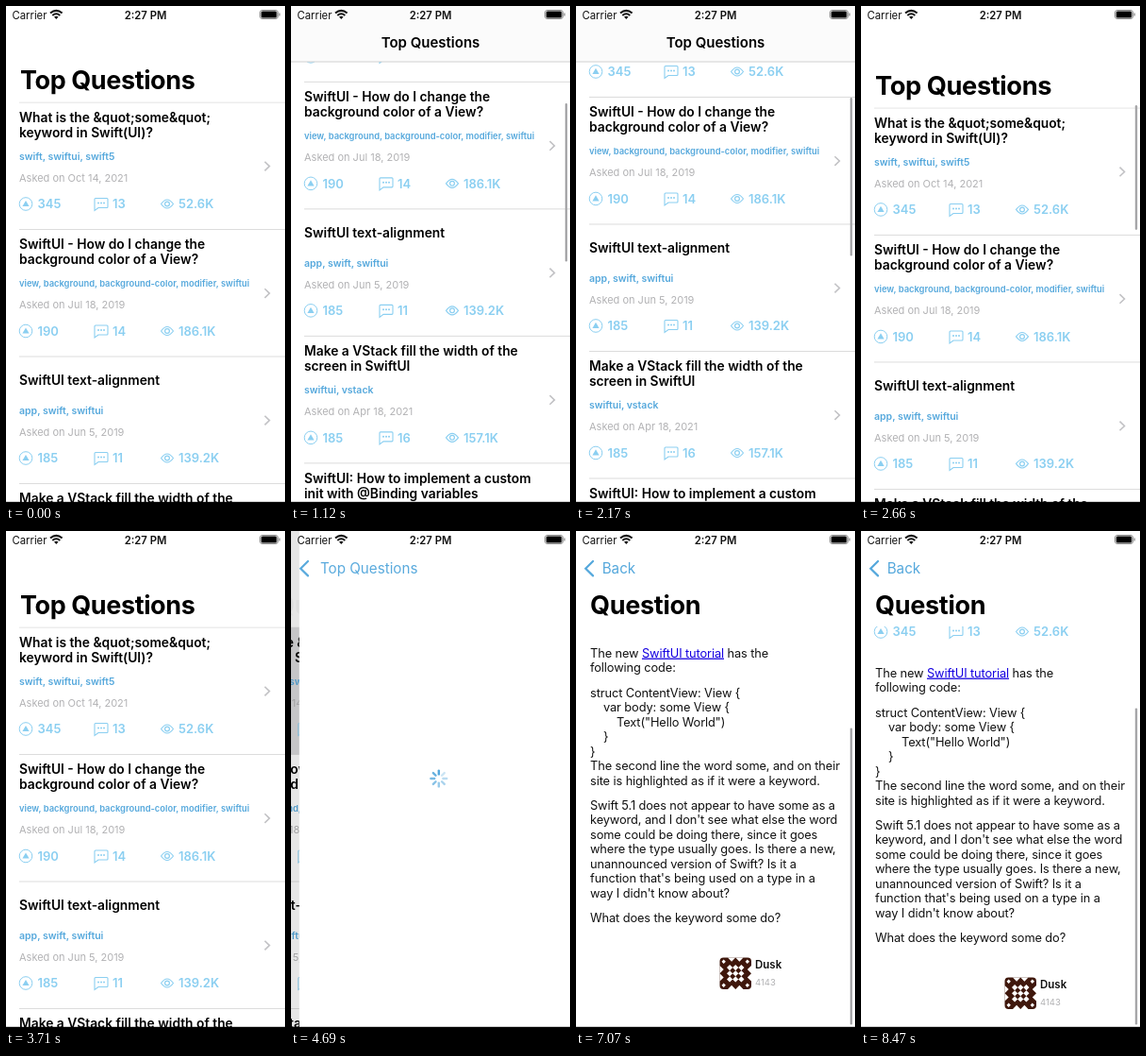
Write an HTML page that moves like this. It is 296 px wide and 526 px high and loops after 8540 ms.

```html
<!DOCTYPE html>
<html lang="en">
<head>
<meta charset="utf-8">
<title>Top Questions</title>
<style>
html, body { margin: 0; width: 100%; height: 100%; overflow: hidden; background: #fff; }
svg { display: block; }
text { font-family: Inter, Roboto, sans-serif; white-space: pre; }
</style>
</head>
<body>
<svg id="stage" width="296" height="526" viewBox="0 0 296 526"></svg>
<script>
const LOOP = 8540, BLUE = '#55a8dc', PALE = '#8bcff1', GRAY = '#b2b2b4', INK = '#111';
const $ = id => document.getElementById(id);
const esc = s => s.replace(/&/g, '&amp;');

// y is the middle of the capitals
const text = (x, y, size, weight, fill, s, spacing = 0, extra = '') =>
  `<text x="${x}" y="${y + size * .36}" font-size="${size}" font-weight="${weight}" fill="${fill}" letter-spacing="${spacing}" ${extra}>${s}</text>`;
const line = (d, color, width = 1, extra = '') =>
  `<path d="${d}" fill="none" stroke="${color}" stroke-width="${width}" ${extra}/>`;
const rect = (x, y, w, h, fill, extra = '') =>
  `<rect x="${x}" y="${y}" width="${w}" height="${h}" fill="${fill}" ${extra}/>`;

const ROWS = [
  [['What is the &quot;some&quot;', 'keyword in Swift(UI)?'], 'swift, swiftui, swift5', 'Asked on Oct 14, 2021', 345, 13, '52.6K'],
  [['SwiftUI - How do I change the', 'background color of a View?'], 'view, background, background-color, modifier, swiftui', 'Asked on Jul 18, 2019', 190, 14, '186.1K'],
  [['SwiftUI text-alignment'], 'app, swift, swiftui', 'Asked on Jun 5, 2019', 185, 11, '139.2K'],
  [['Make a VStack fill the width of the', 'screen in SwiftUI'], 'swiftui, vstack', 'Asked on Apr 18, 2021', 185, 16, '157.1K'],
  [['SwiftUI: How to implement a custom', 'init with @Binding variables'], 'swift, swiftui', 'No date available', 185, 6, '57.1K'],
  [['Add bottom border line to UI', 'TextField view in SwiftUI / Swift /', 'Objective-C / Xamarin'], 'app, objective-c, swift, xamarin, swiftui', 'Asked on Aug 29, 2021', 168, 21, '146.8K'],
  [['Activity indicator in SwiftUI'], 'swiftui', 'Asked on Sep 14, 2020', 168, 14, '90.2K']
];

function stats(y, votes, answers, views) {
  const label = (x, s) => text(x, 0, 13, 600, PALE, s);
  const dots = [98, 101, 104].map(x => `<circle cx="${x}" cy="-1" r="1" fill="${PALE}"/>`).join('');
  return `<g transform="translate(0 ${y})">
    <circle cx="21" cy="0" r="6.8" fill="none" stroke="${PALE}"/><path d="M21 -3.6L24.6 2.6H17.4Z" fill="${PALE}"/>
    ${line('M95 -6H107Q108 -6 108 -5V3Q108 4 107 4H98L94 7V-5Q94 -6 95 -6Z', PALE, 1.1)}${dots}
    ${line('M164.5 0Q171 -9 177.5 0Q171 9 164.5 0Z', PALE, 1.1)}
    <circle cx="171" cy="0" r="2.4" fill="none" stroke="${PALE}" stroke-width="1.2"/>
    ${label(33.5, votes)}${label(113, answers)}${label(183, views)}</g>`;
}

function summary([title, tags, date, ...counts]) {
  const n = title.length, extra = n > 2 ? 12.5 : 0, first = [25, 16, 14][n - 1];
  return title.map((s, i) => text(14, first + i * 16, 13.8, 600, '#000', esc(s))).join('') +
    text(14, 57 + extra, tags.length > 45 ? 9.4 : 10.5, 600, BLUE, tags) +
    text(14, 80 + extra, 11, 400, GRAY, date) + stats(107.5 + extra, ...counts);
}

function list() {
  let y = 0, out = line('M14 0H296', '#dcdcdc');
  ROWS.forEach((row, i) => {
    const h = row[0].length > 2 ? 147 : 134.5;
    out += `<g transform="translate(0 ${y})">${i ? '' : rect(0, 0, 296, h, '#dadadc', 'id="glow"')}
      ${summary(row)}${line(`M274.5 ${h / 2 - 4.5}l5 4.8l-5 4.8`, '#c2c2c5', 1.6)}${line(`M14 ${h}H296`, '#dcdcdc')}</g>`;
    y += h;
  });
  return out;
}

const BODY = [
  [253, 15, 'The new <tspan fill="#1500e0" text-decoration="underline">SwiftUI tutorial</tspan> has the'],
  [268.8, 15, 'following code:'],
  [295, 15, 'struct ContentView: View {'], [310.6, 29, 'var body: some View {'],
  [326.1, 43, 'Text("Hello World")'], [341.7, 29, '}'], [357.2, 15, '}'],
  [372.5, 15, 'The second line the word some, and on their'],
  [388, 15, 'site is highlighted as if it were a keyword.'],
  ...['Swift 5.1 does not appear to have some as a', "keyword, and I don't see what else the word",
    'some could be doing there, since it goes', 'where the type usually goes. Is there a new,',
    'unannounced version of Swift? Is it a', "function that's being used on a type in a",
    "way I didn't know about?"].map((s, i) => [414.3 + i * 15.5, 15, s]),
  [533.5, 15, 'What does the keyword some do?']
];

function avatar(x, y) {
  const grid = [10.6, 16.75, 22.9];
  const diamonds = grid.map(a => grid.map(b => `M${a} ${b - 3.1}l3.1 3.1l-3.1 3.1l-3.1 -3.1Z`).join('')).join('');
  const edges = [0, 90, 180, 270].map(a =>
    `<path transform="rotate(${a} 16.75 16.75)" d="M8.5 0h8.2l-4.1 4.2ZM16.8 0H25l-4.1 4.2ZM4.2 2l2.2 2.2l-2.2 2.2l-2.2 -2.2Z"/>`).join('');
  return `<g transform="translate(${x} ${y})">${rect(0, 0, 33.5, 33.5, '#3f170c', 'rx="4"')}<g fill="#fff"><path d="${diamonds}"/>${edges}</g></g>`;
}

const detail = () => `<g transform="translate(0 102)">${summary(ROWS[0])}</g>` +
  BODY.map(([y, x, s]) => text(x, y, 12.8, 400, INK, s, -.1)).join('') +
  avatar(152.5, 575.5) + text(190, 582.5, 11.5, 600, INK, 'Dusk') + text(190, 602, 9.5, 400, GRAY, '4143');

const bar = id => rect(290.8, 0, 2.4, 0, '#a6a6a8', `id="${id}" rx="1.2"`);
const petals = [...Array(8).keys()].map(i =>
  line('M0 -4.6V-8.4', BLUE, 2.4, `class="petal" stroke-linecap="round" transform="rotate(${i * 45})"`)).join('');

$('stage').innerHTML = `
  <g id="listPage">${rect(0, 0, 296, 526, '#fff')}<g id="rows">${list()}</g>
    <rect id="nav" width="296"/><g id="largeTitle">${text(0, 0, 27, 700, '#000', 'Top Questions', -.4)}</g>
    <rect id="navTop" width="296" height="52"/><path id="navLine" d="M0 59H296" stroke="#d0d0d0"/>
    ${text(148, 39, 15, 600, '#000', 'Top Questions', 0, 'id="smallTitle" text-anchor="middle"')}
    ${bar('listBar')}${rect(0, 0, 296, 526, '#000', 'id="dim"')}</g>
  <g id="detailPage">${rect(0, 0, 296, 526, '#fff')}<g id="spinner" transform="translate(148 262)">${petals}</g>
    <g id="loaded">${text(15, 78, 27, 700, '#000', 'Question', -.3)}
      <svg y="101" width="296" height="425" viewBox="0 101 296 425"><g id="post">${detail()}</g></svg>${bar('postBar')}</g></g>
  <g id="back">${line('M18 32L10.2 39.7L18 47.4', BLUE, 2.2, 'stroke-linecap="round"')}
    <g id="backLong">${text(27.7, 40, 15.2, 400, BLUE, 'Top Questions')}</g>
    <g id="backShort">${text(27.7, 39.5, 15.2, 400, BLUE, 'Back')}</g></g>
  ${text(6.5, 9.5, 11.3, 400, INK, 'Carrier')}
  ${line('M47 7.6Q53.3 2.2 59.6 7.6M49.3 10Q53.3 6.6 57.3 10', INK, 2)}<path d="M51 11.6Q53.3 9.8 55.6 11.6L53.3 14Z" fill="${INK}"/>
  ${text(148, 9.5, 11.3, 600, INK, '2:27 PM', 0, 'text-anchor="middle"')}
  ${rect(269.5, 4.5, 19, 9, 'none', 'rx="2.5" stroke="#888"')}${rect(270.7, 5.5, 16.6, 7, '#000', 'rx="1.5"')}${rect(289.6, 7.5, 1.2, 3, '#888')}
  ${rect(0, 524.8, 296, 1.2, '#000')}`;

const clamp = x => Math.min(1, Math.max(0, x));
const part = (t, a, b) => clamp((t - a) / (b - a));
const smooth = u => u * u * (3 - 2 * u);
const settle = x => (1 + x) * Math.exp(-x);
const set = (id, attrs) => { for (const k in attrs) $(id).setAttribute(k, attrs[k]); };
const move = (id, x, y) => set(id, { transform: `translate(${x} ${y})` });
const fade = (id, opacity) => set(id, { opacity });

function listScroll(t) {
  if (t < 1715) return 517 * smooth(part(t, 780, 1715));
  if (t < 2440) return 517 - 547 * smooth(part(t, 1715, 2440));
  return t < 3010 ? -30 * settle((t - 2440) / 73.5) : 0;
}

function postScroll(t) {
  const u = part(t, 6380, 6950);
  if (t < 6950) return 131 * (u + smooth(u)) / 2;
  return 103 + 28 * settle((t - 6950) / 126);
}

function draw(t) {
  // list with its collapsing title
  const s = listScroll(t), navH = Math.max(59, 102 - s), small = s > 43;
  const tone = small ? '#fbfbfb' : '#fff';
  const push = t < 4200 ? 0 : 1 - settle((t - 4200) / 91.5);
  move('listPage', -88.8 * push, 0);
  move('rows', 0, 102 - s);
  set('nav', { height: navH - (small ? 0 : .5), fill: tone });
  set('navTop', { fill: tone });
  set('largeTitle', { transform: `translate(15 ${78 - s}) scale(${1 + Math.max(0, -s) / 600})`, opacity: small ? 0 : 1 - push });
  fade('navLine', +small);
  fade('smallTitle', part(s, 28, 46));
  const top = Math.min(navH, 102), track = 522 - top;
  set('listBar', { y: top + 3 + Math.max(0, s - 43) * track / 1280, height: track * track / 1280 - Math.max(0, -s) });
  fade('listBar', +(t >= 820 && t < 3010));
  fade('glow', +(t >= 4130));
  fade('dim', .1 * push);

  // pushed page
  const ready = part(t, 4990, 5390);
  move('detailPage', 296 * (1 - push), 0);
  fade('back', push);
  move('backLong', 110 * (1 - push), 0);
  fade('backLong', 1 - ready);
  fade('backShort', ready);
  fade('loaded', ready);
  fade('spinner', +(t < 5020));
  const head = Math.floor((t - 4640) / 100);
  document.querySelectorAll('.petal').forEach((p, i) =>
    p.setAttribute('opacity', 1 - .1 * (((head - i) % 8 + 8) % 8)));

  const d = postScroll(t), over = Math.max(0, d - 103);
  move('post', 0, -d);
  set('postBar', { y: 105 + .8 * Math.min(d, 103) + over, height: 335 - over });
  fade('postBar', +(t >= 6400));
}

const start = performance.now();
function tick() {
  draw((performance.now() - start) % LOOP);
  requestAnimationFrame(tick);
}
tick();
</script>
</body>
</html>
```
